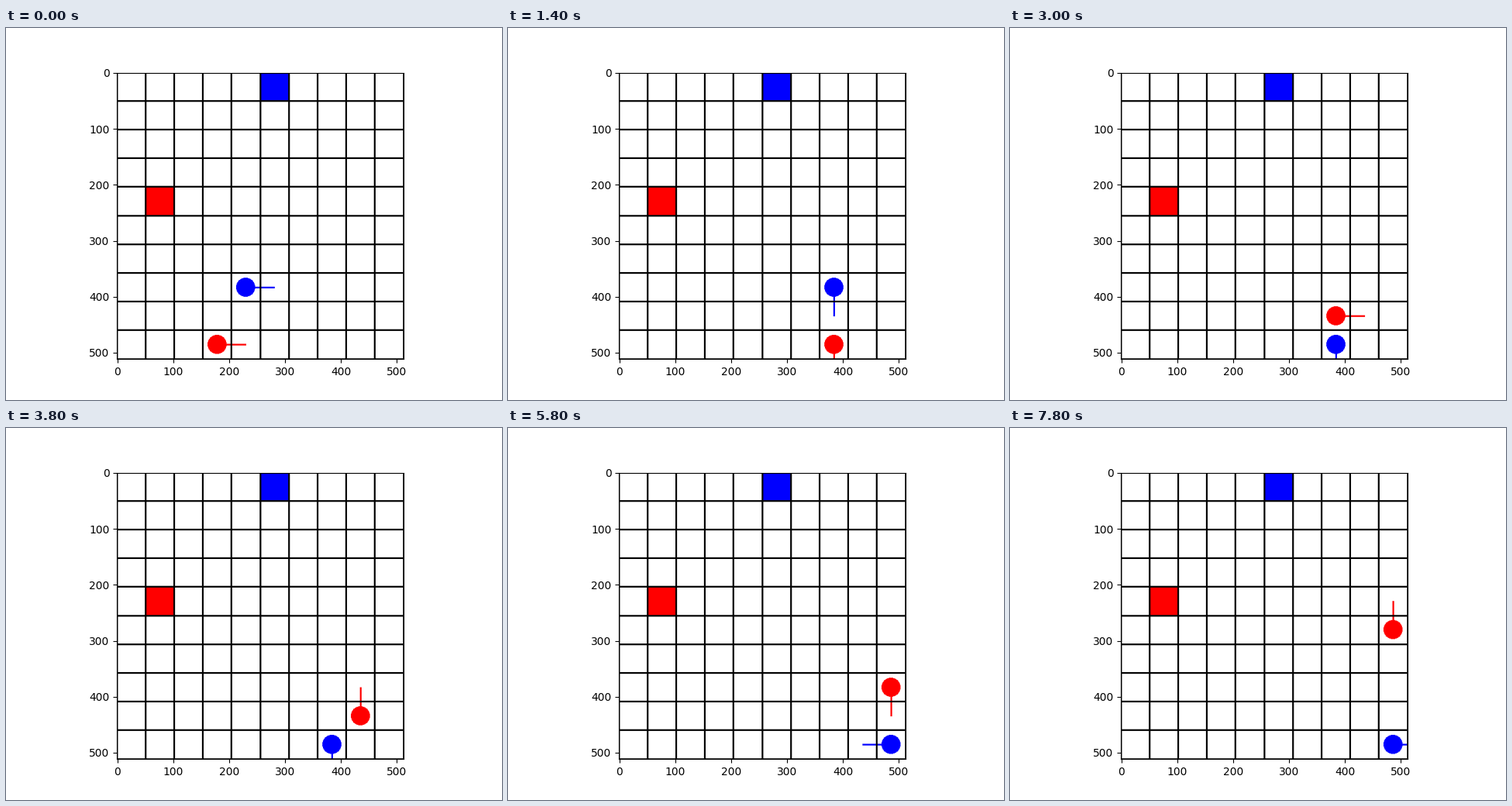
A matplotlib script for the animation above (8 s loop, 640 px wide and 480 px high).

```python
import numpy as np
import matplotlib.pyplot as plt
from matplotlib.animation import FuncAnimation

SIZE, CELLS = 512, 10
PIX = SIZE / CELLS
STEP_MS = 200
RED, BLUE, BLACK = (255, 0, 0), (0, 0, 255), (0, 0, 0)
DIRS = [(1, 0), (0, 1), (-1, 0), (0, -1)]  # clockwise, starting east

# One letter per step: Forward, Back, Left turn, Right turn, "." wait
RED_MOVES = "FFLRFFR" "RL..RRFR" "LRFLRF." "..LFR.R" "L..L" "R..LFF"
BLUE_MOVES = "FLRFF.R" "RRRRF.F." ".....LF" "F.R..R." "FBL." "RLRRR."


def walk(x, y, moves):
    """List of (x, y, heading) for the start and after each move."""
    heading = 0
    states = [(x, y, heading)]
    for move in moves:
        if move in "LR":
            heading = (heading + (1 if move == "R" else -1)) % 4
        elif move in "FB":
            sign = 1 if move == "F" else -1
            dx, dy = DIRS[heading]
            x, y = x + sign * dx, y + sign * dy
        states.append((x, y, heading))
    return states


def fill(img, x0, y0, x1, y1, color):
    """Fill a box with inclusive corners, clipped to the image."""
    img[max(y0, 0):y1 + 1, max(x0, 0):x1 + 1] = color


def draw_target(img, x, y, color):
    px, py, side = int(x * PIX), int(y * PIX), int(PIX)
    fill(img, px, py, px + side - 1, py + side - 1, color)


def draw_agent(img, state, color):
    x, y, heading = state
    dx, dy = DIRS[heading]
    cx, cy = int((x + 0.5) * PIX), int((y + 0.5) * PIX)
    ex, ey = int((x + dx + 0.5) * PIX), int((y + dy + 0.5) * PIX)
    rows, cols = np.ogrid[:SIZE, :SIZE]
    radius = int(PIX / 3)
    img[(cols + 0.5 - cx) ** 2 + (rows + 0.5 - cy) ** 2 < radius ** 2] = color
    # three pixels wide, across the heading only
    wx, wy = abs(dy), abs(dx)
    fill(img, min(cx, ex) - wx, min(cy, ey) - wy,
         max(cx, ex) + wx, max(cy, ey) + wy, color)


def draw_grid(img):
    for i in range(CELLS + 1):
        p = int(i * PIX)
        fill(img, 0, p - 1, SIZE, p + 1, BLACK)
        fill(img, p - 1, 0, p + 1, SIZE, BLACK)


red_path = walk(3, 9, RED_MOVES)
blue_path = walk(4, 7, BLUE_MOVES)


def render(step):
    img = np.full((SIZE, SIZE, 3), 255, np.uint8)
    draw_target(img, 1, 4, RED)
    draw_target(img, 5, 0, BLUE)
    draw_agent(img, red_path[step], RED)
    draw_agent(img, blue_path[step], BLUE)
    draw_grid(img)
    return img


fig, ax = plt.subplots(figsize=(6.4, 4.8), dpi=100)
view = ax.imshow(render(0))


def update(step):
    view.set_data(render(step))
    return [view]


anim = FuncAnimation(fig, update, frames=len(red_path), interval=STEP_MS,
                     repeat=True, repeat_delay=0)
plt.show()
```
